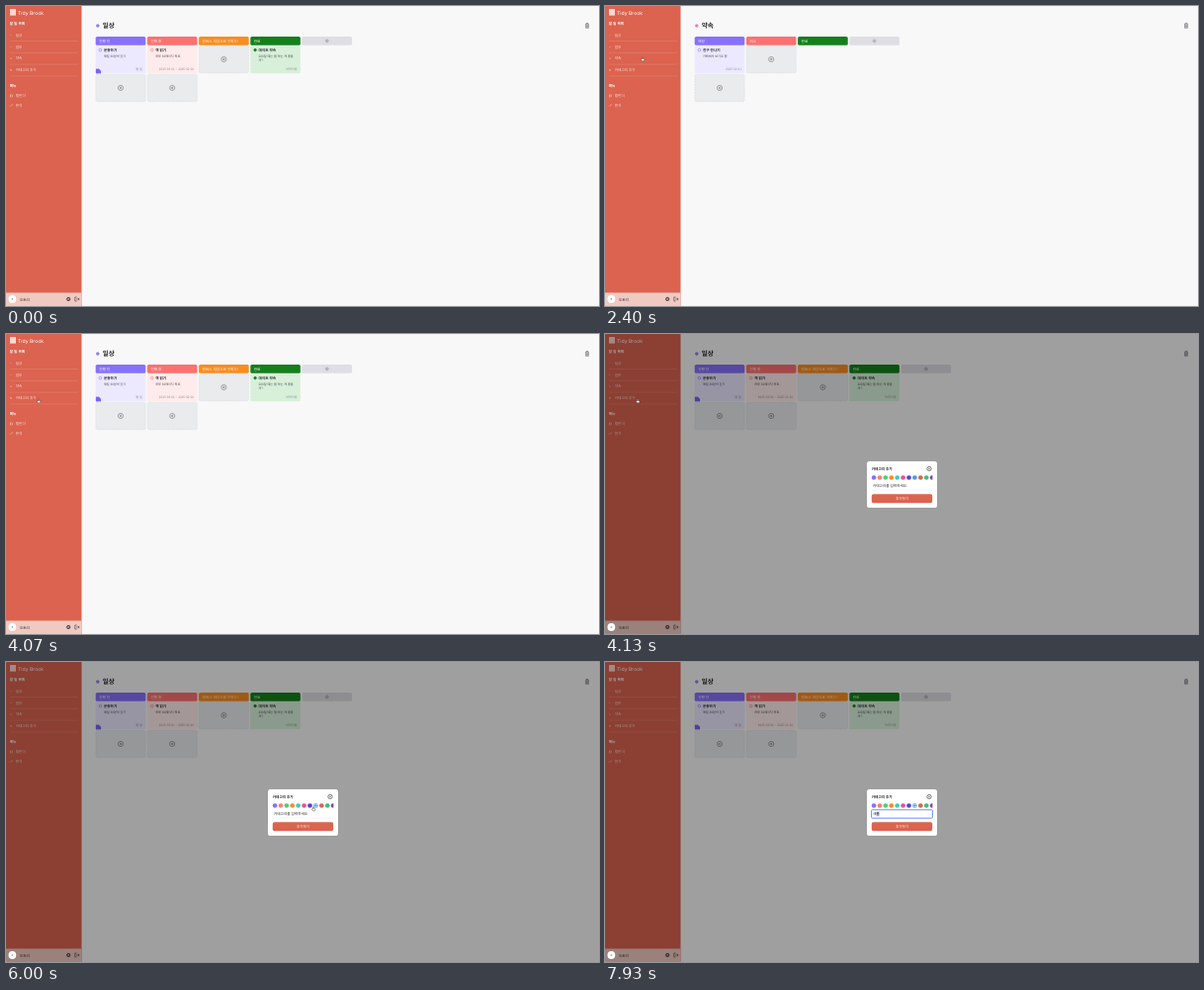
Recreate the animation shown at these times as an HTML page. Size 600 by 304 pixels, loop 8000 ms.

```html
<!DOCTYPE html>
<html lang="ko">
<head>
<meta charset="utf-8">
<style>
  html, body { margin: 0; width: 100%; height: 100%; overflow: hidden; background: #f8f8f8; }
  svg { display: block; width: 600px; height: 304px; }
  text { font-family: "Noto Sans CJK KR", "Noto Sans CJK", "Noto Sans", sans-serif; text-rendering: geometricPrecision; }
</style>
</head>
<body>
<svg id="stage" viewBox="0 0 600 304"></svg>
<script>
const LOOP = 8000;
const PURPLE = '#8671fc', RED = '#ff7070', ORANGE = '#fb8c1e', GREEN = '#14801b';
const CORAL = '#db634f', INK = '#25252a', GRAY = '#8c8c92';
const PITCH = 52.2;

const el = (tag, attrs, body = '') =>
  `<${tag} ${Object.entries(attrs).map(([k, v]) => `${k}="${v}"`).join(' ')}>${body}</${tag}>`;
const rect = (x, y, width, height, fill, more = {}) => el('rect', { x, y, width, height, fill, ...more });
const circle = (cx, cy, r, fill, more = {}) => el('circle', { cx, cy, r, fill, ...more });
const line = (d, stroke, w = 0.5, more = {}) =>
  el('path', { d, stroke, 'stroke-width': w, fill: 'none', ...more });
const text = (x, y, str, size, fill, more = {}) => el('text', { x, y, 'font-size': size, fill, ...more }, str);
const bold = { 'font-weight': 700 };
const medium = { 'font-weight': 500 };
const right = { 'text-anchor': 'end' };
const center = { 'text-anchor': 'middle' };
const group = (id, body) => el('g', { id }, body);

const plus = (x, y, r, color) =>
  circle(x, y, r, 'none', { stroke: color, 'stroke-width': 0.55 }) +
  line(`M${x - r / 2} ${y}h${r}M${x} ${y - r / 2}v${r}`, color, 0.55);

const colX = i => 90.7 + i * PITCH;

function header(i, fill, label) {
  return rect(colX(i), 31, 50.6, 8.8, fill, { rx: 1.6 }) +
    text(colX(i) + 3.5, 36.7, label, 3.6, '#fff', medium);
}

function addColumn(i) {
  return rect(colX(i), 31, 50.6, 8.8, '#dedee4', { rx: 1.6 }) + plus(colX(i) + 25.3, 35.4, 1.5, '#8f8f96');
}

function addSlot(i, row) {
  const y = 40.3 + row * 29;
  return rect(colX(i) + 0.2, y, 50.2, 27.6, '#e9ebed',
    { rx: 1.4, stroke: '#d3d5d9', 'stroke-width': 0.5, 'stroke-dasharray': '1.5 1.2' }) +
    plus(colX(i) + 25.3, y + 13.7, 2.6, '#6d6d74');
}

function card(i, tint, color, title, lines, foot, done) {
  const x = colX(i);
  return rect(x, 40.3, 50.6, 28, tint, { rx: 1.2 }) +
    circle(x + 4.8, 44.6, 1.3, done ? color : 'none', { stroke: color, 'stroke-width': 0.6 }) +
    text(x + 8.3, 46, title, 3.6, INK, bold) +
    lines.map((s, n) => text(x + 8.3, 51.7 + n * 4.1, s, 3.1, '#4a4a50')).join('') +
    text(x + 47.2, 64.8, foot, 3.1, GRAY, right);
}

const heading = (label, dot) => circle(92.8, 20, 1.7, dot) + text(97.8, 22.4, label, 6.6, INK, bold);

const daily = heading('일상', '#8f80ee') +
  header(0, PURPLE, '진행 전') + header(1, RED, '진행 중') +
  header(2, ORANGE, '캔버스 개강으로 구하기!') + header(3, GREEN, '완료') + addColumn(4) +
  card(0, '#ece9ff', PURPLE, '운동하기', ['매일 30분씩 걷기'], '할 일') +
  line('M91 63.8h3l2 2v2.4h-5z', PURPLE, 0.3, { fill: '#7a62ee' }) +
  card(1, '#ffebeb', RED, '책 읽기', ['하루 30페이지 목표'], '2025-02-01 ~ 2025-02-10') +
  card(3, '#d8f0da', GREEN, '데이트 약속', ['200일 때는 뭘 하는 게 좋을', '까?'], '여럿이랑', true) +
  addSlot(2, 0) + addSlot(0, 1) + addSlot(1, 1);

const basicHeaders = header(0, PURPLE, '예정') + header(1, RED, '취소') + header(2, GREEN, '완료') + addColumn(3);
const work = heading('업무', '#ee7f72') + basicHeaders + addSlot(0, 0);
const meet = heading('약속', '#e77fc0') + basicHeaders +
  card(0, '#ece9ff', PURPLE, '친구 만나기', ['카페에서 보기로 함'], '2025-02-01') +
  addSlot(1, 0) + addSlot(0, 1);

const tabs = [['일상', 29.5], ['업무', 41.4], ['약속', 53.1], ['카테고리 추가', 64.9]];
const menu = [['캘린더', 91], ['분석', 100.6]];
const pale = '#fbe4df';

const sidebar = rect(0, 0, 76.5, 304, CORAL) +
  rect(4, 3, 6, 6.6, '#f9d8d1') +
  text(12, 8.5, 'Tidy Brook', 5.1, '#fff', { style: 'font-family: Inter, sans-serif' }) +
  text(3.8, 19.2, '할 일 목록', 3.6, '#fff', bold) +
  tabs.map(([s, y], i) =>
    (i < 3 ? circle(5, y, 0.7, ['#a58bd0', '#ef9184', '#f0b4cf'][i])
           : line(`M4.1 ${y}h1.8M5 ${y - 0.9}v1.8`, pale, 0.4)) +
    text(9.8, y + 1.3, s, 3.6, pale, medium) +
    line(`M4 ${y + 6}H73`, '#e58f80', 0.4)).join('') +
  text(3.8, 82.4, '메뉴', 3.6, '#fff', bold) +
  menu.map(([s, y]) => text(9.8, y + 1.3, s, 3.6, pale, medium)).join('') +
  rect(4.2, 90, 2, 2, 'none', { stroke: pale, 'stroke-width': 0.4 }) +
  line('M4.1 101.7l1-1.2.6.5 1-1.6', pale, 0.4) +
  rect(0, 290.5, 76.5, 13.5, '#f0c9c1') +
  text(14, 298.6, '도토리', 3.6, INK, medium) +
  circle(63.2, 297, 1.6, 'none', { stroke: INK, 'stroke-width': 0.9 }) +
  circle(63.2, 297, 0.5, INK) +
  line('M71.5 295h-1.7v4h1.7M71.2 297h2.9m-1.1-1.2 1.2 1.2-1.2 1.2', INK, 0.55);

const avatar = circle(6.4, 297, 3.9, '#fff') + circle(6.4, 297, 0.9, '#b9a9a6');

const trash = line('M586.1 18.3h3.8M587.3 18v-.6h1.4v.6M586.6 18.5v3.8h2.8v-3.8M587.6 19.3v2.3M588.4 19.3v2.3', '#55555a', 0.55);

const swatches = [PURPLE, '#fb7d78', '#4fcf72', '#fb8c1e', '#45cabd', '#f0508f', '#5a3fe0', '#479af2', CORAL, '#43bd7a', '#7d45a8'];
const swatchX = i => 272.1 + i * 5.9;

const modal = rect(265, 129, 71, 47, '#fff', { rx: 2.6 }) +
  text(269.8, 137.9, '카테고리 추가', 3.6, INK, bold) +
  circle(328, 136.5, 2.2, 'none', { stroke: INK, 'stroke-width': 0.55 }) +
  line('M327.1 135.6l1.8 1.8m0-1.8-1.8 1.8', INK, 0.55) +
  el('clipPath', { id: 'strip' }, rect(269, 142, 62.4, 8, '#000')) +
  el('g', { 'clip-path': 'url(#strip)' }, swatches.map((c, i) => circle(swatchX(i), 145.5, 2.35, c)).join('')) +
  circle(swatchX(7), 145.5, 1.4, 'none', { id: 'picked', stroke: '#fff', 'stroke-width': 0.6 }) +
  line('M270 158.2H331', '#e6e6ea', 0.4) +
  rect(269.6, 149.8, 61.8, 8.4, '#fff', { id: 'focus', rx: 0.8, stroke: '#5b86f5', 'stroke-width': 0.9 }) +
  rect(274.4, 151.6, 3.6, 4.8, '#cdd3e2', { id: 'mark' }) +
  text(271, 155, '', 3.6, INK, { id: 'entry' }) +
  rect(269.8, 162.2, 61.4, 9, CORAL, { rx: 1.8 }) +
  text(300.5, 167.9, '추가하기', 3.6, '#fff', { ...medium, ...center });

const hand = line('M-.5 0v2l-.8-.3-.4.5 1.2 1.6h2.1l.5-1.9-1.7-.5V0z', '#2a2a2e', 0.4, { fill: '#fff', 'stroke-linejoin': 'round' });

document.getElementById('stage').innerHTML =
  rect(0, 0, 600, 304, '#f8f8f8') + trash +
  group('daily', daily) + group('work', work) + group('meet', meet) + sidebar +
  group('dialog', rect(0, 0, 600, 304, '#000', { opacity: 0.36 }) + modal) + avatar +
  group('cursor', hand);

// [time, x, y]
const path = [
  [70, 226, 70], [870, 48, 45], [1070, 40, 41], [1600, 40, 41], [1950, 38, 52],
  [3000, 38, 52], [3300, 17, 29], [3500, 17, 29], [3800, 31, 65], [3930, 33, 66],
  [4130, 33, 66], [4870, 328, 147], [5070, 312, 147], [6000, 311, 147], [6400, 300, 153]
];
const pages = [[0, 'daily'], [1270, 'work'], [2000, 'meet'], [3400, 'daily']];
const typed = [[0, '카테고리를 입력하세요'], [6870, 'ㅅ'], [7130, '새'], [7400, '샐'], [7600, '새로'], [7860, '새롭']];

const at = (steps, t) => steps.filter(s => s[0] <= t).pop()[1];

function place(t) {
  const i = path.findIndex(p => p[0] > t);
  if (i < 1) return path[i < 0 ? path.length - 1 : 0].slice(1);
  const [t0, x0, y0] = path[i - 1], [t1, x1, y1] = path[i];
  const u = (t - t0) / (t1 - t0), k = u * u * (3 - 2 * u);
  return [x0 + (x1 - x0) * k, y0 + (y1 - y0) * k];
}

const byId = id => document.getElementById(id);
const show = (id, on) => byId(id).setAttribute('visibility', on ? 'visible' : 'hidden');

function draw(t) {
  const page = at(pages, t), entry = at(typed, t), open = t >= 4130;
  ['daily', 'work', 'meet'].forEach(id => show(id, id === page));
  show('dialog', open);
  show('picked', open && t >= 5270);
  show('focus', t >= 6530);
  show('mark', t >= 7600);
  byId('entry').textContent = entry;
  show('cursor', t >= 70 && t < 6870);
  byId('cursor').setAttribute('transform', `translate(${place(t).join(' ')})`);
}

const start = performance.now();
function tick(now) {
  draw(Math.max(0, now - start) % LOOP);
  requestAnimationFrame(tick);
}
draw(0);
requestAnimationFrame(tick);
</script>
</body>
</html>
```
